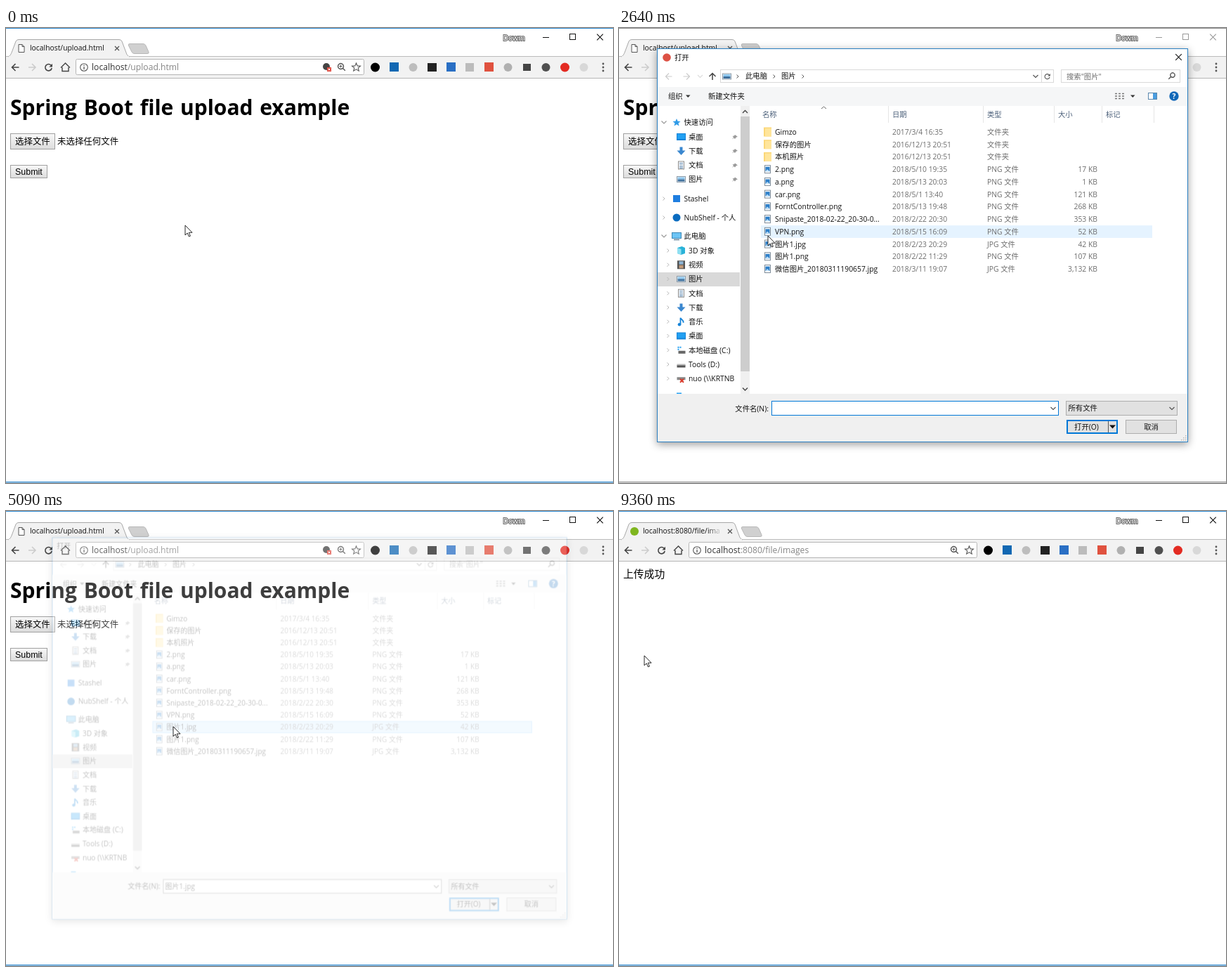
Recreate the animation shown at these times as an HTML page. Size 864 px wide and 648 px high, loop 9830 ms.

```html
<!DOCTYPE html>
<html lang="zh-CN">
<head>
<meta charset="utf-8">
<title>File upload</title>
<style>
html, body { margin: 0; width: 100%; height: 100%; overflow: hidden; background: #fff; }
svg { display: block; width: 864px; height: 648px; }
text { font: 10.35px 'Open Sans', 'Noto Sans CJK SC', 'Noto Sans CJK', sans-serif; fill: #111; white-space: pre; }
.page { font: 12.45px 'Liberation Sans', 'Noto Sans CJK SC', 'Noto Sans CJK', sans-serif; fill: #000; }
.done { font-size: 14.8px; }
.title { font-size: 30px; font-weight: 700; word-spacing: 1.9px; fill: #000; }
.url { font-size: 12.15px; fill: #333; }
.url tspan { fill: #858585; }
.dim { fill: #6d6d6d; }
.head { fill: #4c607a; }
.end { text-anchor: end; }
.mid { text-anchor: middle; }
.user { fill: #fff; stroke: #666; stroke-width: 2px; paint-order: stroke; }
.help { fill: #fff; font-weight: 700; }
#dialog { transform-origin: 432px 309px; }
#frame { filter: drop-shadow(0 3px 6px rgba(0, 0, 0, .4)); }
#spin { transform-origin: 22px 29px; }
</style>
</head>
<body>
<script>
const LOOP = 9830;
const BLUE = '#0078d7';

// Drawing helpers
const text = (x, y, s, cls = '') => `<text x="${x}" y="${y}" class="${cls}">${s}</text>`;
const box = (x, y, w, h, fill, more = '') => `<rect x="${x}" y="${y}" width="${w}" height="${h}" fill="${fill}" ${more}/>`;
const framed = (x, y, w, h, fill, edge, more = '') => box(x + .5, y + .5, w - 1, h - 1, fill, `stroke="${edge}" ${more}`);
const dot = (x, y, r, fill, more = '') => `<circle cx="${x}" cy="${y}" r="${r}" fill="${fill}" ${more}/>`;
const line = (d, color = '#444', w = 1.2) => `<path d="${d}" fill="none" stroke="${color}" stroke-width="${w}"/>`;
const shape = (d, fill, more = '') => `<path d="${d}" fill="${fill}" ${more}/>`;
const group = (id, ...parts) => `<g id="${id}">${parts.join('')}</g>`;
const at = (x, y, s) => `<g transform="translate(${x} ${y})">${s}</g>`;
const cross = (x, y, r, color, w) => line(`M${x - r} ${y - r}l${2 * r} ${2 * r}m0 ${-2 * r}l${-2 * r} ${2 * r}`, color, w);
const down = (x, y, color = '#555') => line(`M${x - 3.5} ${y - 2}l3.5 3.5 3.5-3.5`, color);
const right = (x, y, color = '#555') => line(`M${x - 1.5} ${y - 2.5}l2.5 2.5-2.5 2.5`, color, 1);
const arrow = (x, y, dir, color, r = 5, w = 1.6) =>
  line(`M${x - r * dir} ${y}h${2 * r * dir}m${-r * dir} ${-r}l${r * dir} ${r}l${-r * dir} ${r}`, color, w);
const lens = (x, y, r, dir, color) => line(`M${x + r} ${y}a${r} ${r} 0 1 0 0 .01M${x + .7 * r * dir} ${y + .7 * r}l${3.5 * dir} 3.5`, color, 1.4);
const button = (x, y, w, h) => framed(x, y, w, h, 'url(#face)', '#a0a0a0');
const reload = (x, y, r, color, w) =>
  line(`M${x + r * .75} ${y - r * .65}A${r} ${r} 0 1 0 ${x + r} ${y + 1}`, color, w) +
  shape(`M${x + r + .8} ${y - r - .5}v${r}h${-r}z`, color);

// Small icons centred on 0,0
const icons = {
  star: shape('M0-5.5L1.6-1.8 5.5-1.5 2.5 1 3.5 5 0 2.8-3.5 5-2.5 1-5.5-1.5-1.6-1.8z', '#2f9be8'),
  desk: box(-6.5, -5, 13, 10, '#1583d8') + box(-5.5, -4, 11, 7, '#22a0f2'),
  down: shape('M-2-5.5h4v5h4L0 6-6-.5h4z', '#3a87cf'),
  doc: framed(-4.5, -6, 9, 12, '#fff', '#8a8a8a') + line('M-2.5-3h5m-5 2.5h5m-5 2.5h5m-5 2h5', '#5a86b0', 1),
  pic: framed(-6.5, -4.5, 13, 9, '#fff', '#8a9aa8') + box(-5, -3, 10, 3, '#8cc6ee') + box(-5, 0, 10, 3, '#3d6f9c'),
  stash: box(-5, -5, 10, 10, '#1f7ee0'),
  cloud: dot(0, 0, 5.5, '#0a6cc0'),
  pc: framed(-7, -5.5, 14, 9, '#6cc4f5', '#3d87b5') + line('M-4 5h8', '#5f7f95', 1.5),
  cube: shape('M-5.5-4L1-6 5.5-4V4L0 6-5.5 4z', '#29b2d8') + shape('M-5.5-4L0-2V6L-5.5 4z', '#8fe0f2'),
  film: box(-5.5, -6, 11, 12, '#555') + box(-3, -5, 6, 4.5, '#8eb5d5') + box(-3, .5, 6, 4.5, '#c39b7a'),
  note: line('M-1 4V-5.5C0-2.5 4-2.5 3 1.5', '#1583d8', 1.8) + dot(-2.5, 4, 2.3, '#1583d8'),
  disk: box(-6, 1, 12, 3.5, '#555') + box(-6, -.5, 12, 2, '#bbb'),
  system: box(-5, -5, 2, 2, '#22a0f2') + box(-2, -5, 2, 2, '#22a0f2') + box(-5, -2, 2, 2, '#22a0f2') + box(-4, 1, 10, 4, '#666'),
  net: box(-6, -2, 12, 4, '#888') + cross(1, 3, 2.5, '#d93a2b', 2),
  image: framed(-4.5, -6, 9, 12, '#fff', '#7d8b98') + box(-3, -3.5, 6, 6.5, '#2c7fc9') + shape('M-3 3l2.5-3L3 3z', '#bfe0f8'),
  folder: box(-5.5, -6.5, 11, 13, '#fbd778') + box(-3.5, -5, 9, 11.5, '#ffe59b')
};

const page = () => [
  group('form',
    text(6, 123.5, 'Spring Boot file upload example', 'title'),
    button(6, 150, 64, 23), text(13, 166, '选择文件', 'page'),
    group('none', text(73, 166, '未选择任何文件', 'page')),
    group('chosen', text(73, 166, '图片1.jpg', 'page')),
    button(6, 195, 53, 19), text(13, 209, 'Submit', 'page')),
  group('result', text(6, 95, '上传成功', 'page done'))
].join('');

const controls = color =>
  line('M764 13.5h9', color, 1) + framed(802, 8, 9, 9, 'none', color) + cross(845.5, 13, 4.3, color, 1.1);

const edges = color => box(0, 0, 864, 1, color) + box(0, 646, 864, 1.3, color);

const extensions = () => [
  dot(525.5, 56, 6.5, '#000'), box(546, 49, 13, 13, '#1268b3'), dot(579.5, 56, 6, '#bdbdbd'),
  box(600, 50, 13, 12, '#222'), box(627, 49, 13, 13, '#2a6fc4'), box(654, 50, 12, 12, '#bcbcbc'),
  box(681, 49, 13, 13, '#e0523f'), dot(714.5, 56, 6, '#b0b0b0'), box(736, 51, 11, 10, '#444'),
  dot(768.5, 56, 6, '#505050'), dot(795.5, 56, 6.5, '#e32b22'), dot(822.5, 56, 6, '#d8d8d8'),
  ...[51, 56, 61].map(y => dot(850, y, 1.4, '#555'))
].join('');

const browser = () => [
  box(0, 40, 864, 31, '#f2f2f2'),
  line('M0 40.5h864', '#bcbcbc', 1), line('M0 71.5h864', '#b6b6b6', 1),
  shape('M3 41C6 40 7 37 8 35L14 19Q15 16.500 18 16.500H161Q164 16.500 165 19L171 35C172 38 173 40 176 41', '#f2f2f2', 'stroke="#a8a8a8"'),
  box(4, 40, 171, 2, '#f2f2f2'),
  shape('M176 22.500H195Q198 22.500 199 25L203 34Q204 36.500 201 36.500H183Q180 36.500 179 34L174.500 25Q173.500 22.500 176 22.500z', '#d0d0d0', 'stroke="#b8b8b8"'),
  group('sheet', shape('M18 23.500h5l3 3V34.500h-8zM23 23.500v3h3', '#fff', 'stroke="#555"')),
  group('spin', line('M22 23.500a5.500 5.500 0 1 0 5.500 5.500', '#7a8aa0', 1.8)),
  group('leaf', dot(22, 29, 6, '#7fb61f')),
  group('tab1', text(34, 32, 'localhost/upload.html')),
  group('tab2', text(34, 32, 'localhost:8080/file/ima'), box(126, 20, 24, 18, 'url(#fade)')),
  cross(158, 29, 3, '#555', 1.3),
  text(723, 17.5, 'Dowm', 'mid user'),
  arrow(13.5, 56, -1, '#444'), arrow(37, 56, 1, '#ccc'),
  group('reload', reload(60.5, 56, 4.7, '#444', 1.6)),
  group('stop', cross(60.5, 56, 4.3, '#444', 1.6)),
  line('M78 56.500L84.500 50 91 56.500M80 56v5.500h9V56', '#444', 1.4),
  framed(99, 44, 411, 23, '#fff', '#b5b5b5', 'rx="2"'),
  dot(111, 56, 5.3, 'none', 'stroke="#555" stroke-width="1.1"'), box(110.4, 55, 1.3, 4, '#555'), box(110.4, 52.5, 1.3, 1.4, '#555'),
  group('url1', text(122, 60, 'localhost<tspan>/upload.html</tspan>', 'url')),
  group('url2', text(122, 60, 'localhost<tspan>:8080/file/images</tspan>', 'url')),
  group('cookie', dot(456, 55, 5, '#444'), box(457, 56, 6, 6, '#e04a3f'), cross(460, 59, 1.4, '#fff', .9)),
  lens(476.5, 54.5, 4, 1, '#555'), line('M474.500 54.500h4m-2-2v4', '#555', 1),
  line('M498.500 50l1.700 3.900 4.300.3-3.300 2.700 1.100 4.200-3.800-2.300-3.800 2.300 1.100-4.200-3.300-2.700 4.300-.3z', '#555', 1.1),
  extensions(),
  edges('#8f8f8f'), controls('#999'),
  group('active', box(760, 6, 94, 14, '#fff'), edges('#2f8ad2'), controls('#111'))
].join('');

const ROW = 17.73, TOP = 139.2;
const files = [
  ['Gimzo', '2017/3/4 16:35'], ['保存的图片', '2016/12/13 20:51'], ['本机照片', '2016/12/13 20:51'],
  ['2.png', '2018/5/10 19:35', '17'], ['a.png', '2018/5/13 20:03', '1'], ['car.png', '2018/5/1 13:40', '121'],
  ['ForntController.png', '2018/5/13 19:48', '268'], ['Snipaste_2018-02-22_20-30-0...', '2018/2/22 20:30', '353'],
  ['VPN.png', '2018/5/15 16:09', '52'], ['图片1.jpg', '2018/2/23 20:29', '42'],
  ['图片1.png', '2018/2/22 11:29', '107'], ['微信图片_20180311190657.jpg', '2018/3/11 19:07', '3,132']
];
const fileRow = ([name, date, size], i) => {
  const y = 148 + i * ROW;
  const type = !size ? '文件夹' : name.endsWith('.jpg') ? 'JPG 文件' : 'PNG 文件';
  return at(211.5, y, size ? icons.image : icons.folder) + text(222, y + 4, name) + text(389, y + 4, date, 'dim') +
    text(524, y + 4, type, 'dim') + (size ? text(681, y + 4, size + ' KB', 'dim end') : '');
};

// label, icon, y, level
const tree = [
  ['快速访问', 'star', 134.5, 0], ['桌面', 'desk', 155, 2], ['下载', 'down', 175, 2], ['文档', 'doc', 195.5, 2], ['图片', 'pic', 215.5, 2],
  ['Stashel', 'stash', 243, 0], ['NubShelf - 个人', 'cloud', 270, 0], ['此电脑', 'pc', 296.5, 0],
  ...[['3D 对象', 'cube'], ['视频', 'film'], ['图片', 'pic'], ['文档', 'doc'], ['下载', 'down'], ['音乐', 'note'], ['桌面', 'desk'],
    ['本地磁盘 (C:)', 'system'], ['Tools (D:)', 'disk'], ['nuo (\\\\KRTNB', 'net']].map(([s, k], i) => [s, k, 317 + i * 20.25, 1])
];
const treeRow = ([label, icon, y, level]) =>
  at(level ? 88.5 : 82, y, icons[icon]) + text(level ? 99 : 92.5, y + 3.8, label) +
  (level == 2 ? shape(`M165 ${y - 3}l4 3-2 .5-2 2.500-1.500-1.500-2.500 2 2-3-1.500-1.500 2.500-.5z`, '#9a9a9a') : '');
const chevron = ([label, , y, level]) =>
  level == 2 ? '' : /快速|此电脑/.test(label) ? down(64, y, '#999') : right(level ? 70 : 64, y, '#b5b5b5');

const dialog = () => [
  box(54.5, 29.5, 755, 560, '#fff', 'id="frame" stroke="#2b80c2"'),
  group('caption', text(79, 45.5, '打开')),
  group('chrome', dot(68, 42, 5.8, '#dd5144'), cross(796.5, 41.5, 4.3, '#111', 1.1)),
  arrow(71, 69, -1, '#ccc', 4.5, 1.2), arrow(96, 69, 1, '#ccc', 4.5, 1.2), down(115.5, 69, '#ddd'),
  line('M133 74v-9.500m-4.500 4.500l4.500-4.500 4.500 4.500', '#444', 1.5),
  framed(144, 59, 475, 19, '#fff', '#d9d9d9'), line('M601.500 59v19', '#d9d9d9', 1),
  at(153.5, 69, icons.pic), right(169, 69), text(180, 72, '此电脑'), right(221, 69), text(231, 72, '图片'), right(262, 69),
  down(593, 69), reload(609.5, 69, 3.5, '#555', 1.1),
  framed(629, 59, 170, 19, '#fff', '#d9d9d9'), text(637, 72.5, '搜索"图片"', 'dim'), lens(788, 67, 3.2, -1, '#555'),
  box(55, 84, 754, 27, '#f5f6f7'),
  text(70, 101, '组织'), shape('M95 95.500h6.500l-3.250 3.500z', '#333'), text(127, 101, '新建文件夹'),
  line('M706 93.500h3m2 0h3m2 0h3m-13 3.500h3m2 0h3m2 0h3m-13 3.500h3m2 0h3m2 0h3', '#777', 1.5),
  shape('M728 95.500h6.500l-3.250 3.500z', '#333'),
  framed(753, 92, 13, 10, '#fff', '#5a87ad'), box(760, 93, 5, 8, '#4a9de0'),
  dot(790, 97, 6.7, '#1268b8'), text(790, 100.8, '?', 'mid help'),
  ...[['名称', 204], ['日期', 389], ['类型', 524], ['大小', 625], ['标记', 693]].map(([s, x]) => text(x, 126.5, s, 'head')),
  ...[383, 518, 619, 687, 761].map(x => box(x, 111, 1, 24, '#e5e5e5')),
  line('M288 115l3.500-3 3.500 3', '#666', 1),
  group('hover', box(202, TOP, 557, ROW, '#e5f3ff')),
  group('picked', framed(201.5, TOP + 9 * ROW, 557, ROW, '#cce8ff', '#99d1ff')),
  ...files.map(fileRow),
  '<g clip-path="url(#side)">', box(55, 348, 117, 20, '#d9d9d9'), ...tree.map(treeRow), box(82, 519.5, 7, 2, '#22a0f2'),
  group('chevrons', ...tree.map(chevron)), '</g>',
  box(173, 111, 13, 410, '#f0f0f0'), box(173, 126, 13, 363, '#cdcdcd'),
  line('M176 121l3.500-3.500 3.500 3.500', '#444', 1.4), line('M176 512.500l3.500 3.500 3.500-3.500', '#444', 1.4),
  box(55, 521, 754, 68, '#f0f0f0'),
  text(213, 545.5, '文件名(N):', 'end'),
  framed(217, 531, 409, 21, '#fff', '#7a7a7a'),
  group('focus', framed(217, 531, 409, 21, '#fff', BLUE)),
  group('caret', box(223, 535, 1, 14, '#000')),
  group('name', text(220, 545.5, '图片1.jpg')),
  down(618, 542), framed(636, 531, 159, 21, '#e1e1e1', '#adadad'), text(639.5, 545, '所有文件'), down(787, 542),
  box(638, 559, 71, 18, '#e1e1e1', `stroke="${BLUE}" stroke-width="2"`), line('M696.500 560v16', '#555', 1),
  text(665.5, 571.5, '打开(O)', 'mid'), shape('M698 565.500h9l-4.500 5z', '#111'),
  framed(721, 558, 73, 20, '#e1e1e1', '#adadad'), text(757.5, 571.5, '取消', 'mid'),
  ...[[806, 580], [806, 583], [806, 586], [803, 583], [803, 586], [800, 586]].map(([x, y]) => box(x, y, 1.5, 1.5, '#bbb'))
].join('');

document.body.innerHTML = `<svg viewBox="0 0 864 648">
<defs>
  <linearGradient id="face" x2="0" y2="1"><stop stop-color="#f8f8f8"/><stop offset="1" stop-color="#dcdcdc"/></linearGradient>
  <linearGradient id="fade"><stop stop-color="#f2f2f2" stop-opacity="0"/><stop offset=".85" stop-color="#f2f2f2"/></linearGradient>
  <clipPath id="side"><rect x="55" y="111" width="117" height="410"/></clipPath>
</defs>
${page()}${browser()}${group('dialog', dialog())}
${group('busy', dot(48, 206, 5.5, 'none', 'stroke="#45a5e6" stroke-width="2.5"'))}
${group('cursor', shape('M0 0V14L3.200 11 5.400 16 7.400 15.200 5.300 10.300H10z', '#fff', 'stroke="#111" stroke-width=".9"'))}
</svg>`;

// Timeline: stepped keyframes written in milliseconds
let css = '';
const play = (id, frames) => {
  const keys = frames.map(([ms, rule]) => `${Math.max(0, ms - 2) / LOOP * 100}%{${rule}}`).join('');
  css += `@keyframes ${id}-run{${keys}}#${id}{animation:${id}-run ${LOOP}ms step-end infinite}`;
};
const fade = (id, ...frames) => play(id, frames.map(([ms, v]) => [ms, `opacity:${v}`]));
const show = (id, on, ...flips) => fade(id, [0, on], ...flips.map((ms, i) => [ms, (i + on + 1) % 2]));

// Mouse path: start, end, steps, target
const trail = [[0, 255, 281]];
const ease = u => u * u * (3 - 2 * u);
[
  [140, 1090, 14, 33, 161], [1160, 1160, 1, 33, 162],
  [2360, 2640, 5, 212, 296], [2710, 3340, 10, 255, 305],
  [3780, 4100, 5, 328, 307], [4400, 4680, 5, 238, 307],
  [5450, 6110, 10, 36, 206]
].forEach(([start, end, n, x, y]) => {
  const [, x0, y0] = trail[trail.length - 1];
  for (let i = 1; i <= n; i++) {
    const u = ease(i / n);
    trail.push([start + (end - start) * (i - 1) / Math.max(1, n - 1), x0 + (x - x0) * u, y0 + (y - y0) * u]);
  }
});
play('cursor', trail.map(([ms, x, y]) => [ms, `transform:translate(${Math.round(x)}px,${Math.round(y)}px)`]));
play('hover', trail.map(([ms, x, y]) => {
  const row = Math.floor((y - TOP) / ROW);
  const over = ms > 2300 && x > 201 && row >= 0 && row < files.length;
  return [ms, `opacity:${+over};transform:translateY(${row * ROW}px)`];
}));

play('dialog', [
  [0, 0, .96], [1810, .25, .965], [1880, .62, .983], [1950, .85, .993], [2020, .95, .998], [2090, 1, 1],
  [5020, .6, .985], [5090, .25, .97], [5160, 0, .96]
].map(([ms, o, s]) => [ms, `opacity:${o};transform:scale(${s})`]));
fade('active', [0, 1], [1360, .66], [1460, .33], [1560, 0], [4950, 1]);
fade('chevrons', [0, 0], [2430, .5], [2500, 1], [2850, .7], [2920, .4], [2990, 0]);
show('caret', 1, 2360, 2890, 3410, 3940, 4470);
show('picked', 0, 4750);
show('name', 0, 4750);
show('focus', 1, 4750);
show('chrome', 1, 4950);
play('caption', [[0, 'transform:none'], [4950, 'transform:translateX(-18px)']]);
show('none', 1, 5160);
show('chosen', 0, 5160);

show('sheet', 1, 6690, 7300, 7470);
show('leaf', 0, 7470);
play('spin', [[0, 'opacity:0'], ...Array.from({ length: 9 }, (_, i) => [6690 + i * 70, `opacity:1;transform:rotate(${-50 * i}deg)`]), [7300, 'opacity:0']]);
show('reload', 1, 6690, 7300);
show('stop', 0, 6690, 7300);
['form', 'tab1', 'url1'].forEach(id => show(id, 1, 7000));
['result', 'tab2', 'url2'].forEach(id => show(id, 0, 7000));
show('cookie', 1, 7470);
show('busy', 0, 7000, 9360);

document.head.appendChild(document.createElement('style')).textContent = css;
</script>
</body>
</html>
```
